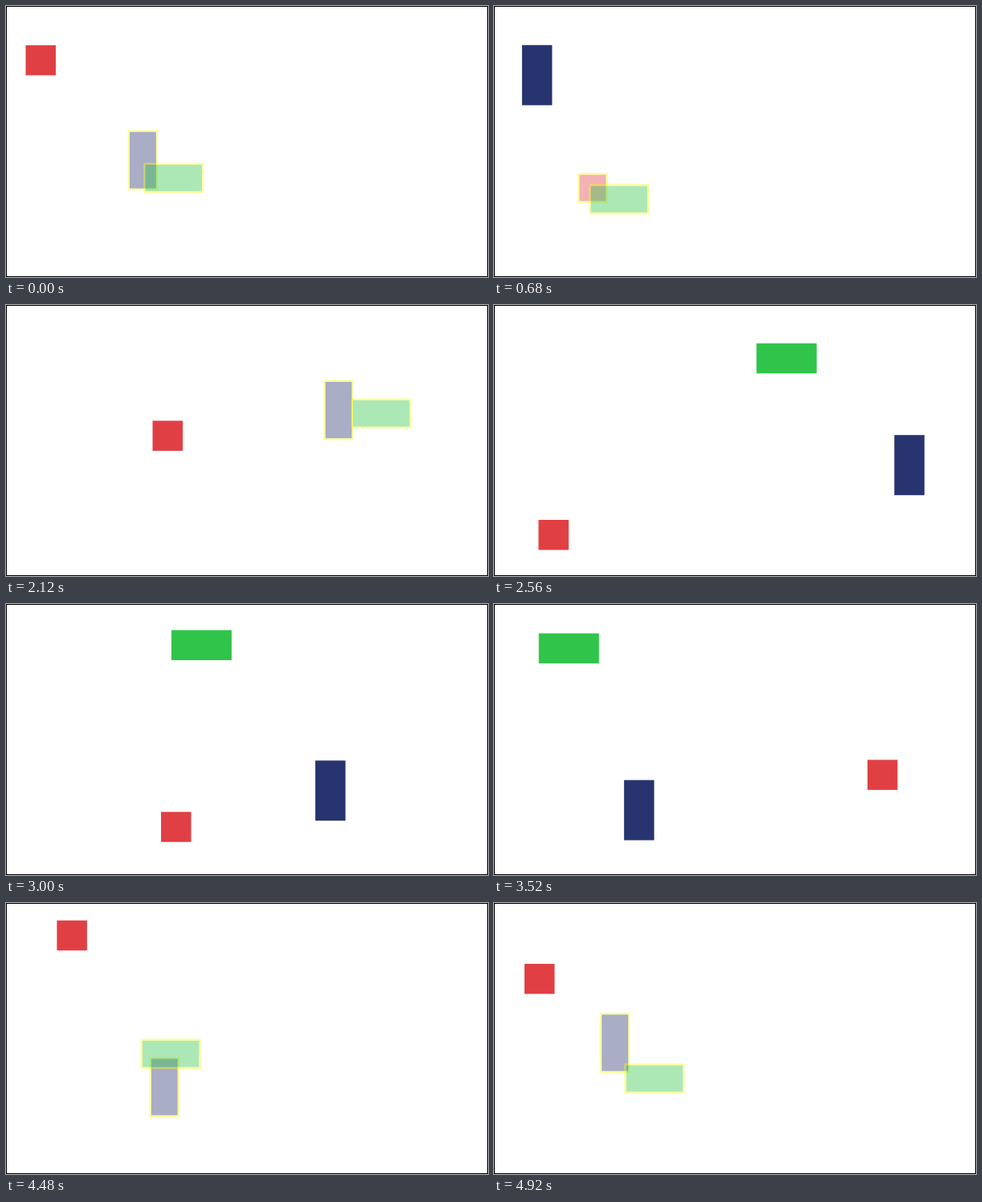
Animation, 600 px wide and 338 px high, one loop 4960 ms. Source, as an HTML page with a canvas:

```html
<!DOCTYPE html>
<html lang="en">
<head>
<meta charset="utf-8">
<title>Overlap detection</title>
<style>
  html, body { margin: 0; height: 100%; overflow: hidden; background: #fff; }
  canvas { display: block; }
</style>
</head>
<body>
<canvas id="stage" width="600" height="338"></canvas>
<script>
const ctx = document.getElementById('stage').getContext('2d');

const LOOP = 4960, TICK = 40;     // playback length and frame step, ms
const LEG = 961, OFFSET = 209;    // time between waypoints, phase at start
const SCALE = 0.75, SIZE = 50, BORDER = 3;

const point = (x, y) => ({ x, y });
const corner = point(0, 0), center = point(250, 250), low = point(150, 300),
      right = point(700, 240), top_ = point(400, 40), left = point(30, 50),
      bottom = point(30, 400);

// The tall and the wide box run the same ring in opposite directions.
const ring = [left, top_, right, low, center];
const box = (color, w, h, path) => ({ color, w: w * SIZE, h: h * SIZE, path });
const boxes = [
  box('#e04044', 1, 1, [corner, low, top_, bottom, right]),
  box('#283470', 1, 2, [center, ...ring.slice(0, -1)]),
  box('#30c54a', 2, 1, [...ring].reverse())
];

function move(box, time) {
  const legs = time / LEG, i = Math.floor(legs), f = legs - i;
  const n = box.path.length;
  const from = box.path[i % n], to = box.path[(i + 1) % n];
  box.x = from.x + (to.x - from.x) * f;
  box.y = from.y + (to.y - from.y) * f;
}

const overlap = (a, b) =>
  a.x < b.x + b.w && b.x < a.x + a.w && a.y < b.y + b.h && b.y < a.y + a.h;

function drawBox(box) {
  const { x, y, w, h, color } = box;
  const hit = boxes.some(other => other !== box && overlap(box, other));
  const inset = hit ? BORDER : 0;
  ctx.globalAlpha = hit ? 0.4 : 1;
  ctx.fillStyle = color;
  ctx.fillRect(x + inset, y + inset, w - 2 * inset, h - 2 * inset);
  if (hit) {
    ctx.strokeStyle = '#ff0';
    ctx.lineWidth = BORDER;
    ctx.strokeRect(x + BORDER / 2, y + BORDER / 2, w - BORDER, h - BORDER);
  }
}

function draw() {
  const now = performance.now() % LOOP;
  const time = Math.floor(now / TICK) * TICK + OFFSET;
  boxes.forEach(box => move(box, time));

  ctx.clearRect(0, 0, 600, 338);
  ctx.save();
  ctx.scale(SCALE, SCALE);
  boxes.forEach(drawBox);
  ctx.restore();

  ctx.strokeRect(0.5, 0.5, 599, 337);
  requestAnimationFrame(draw);
}
draw();
</script>
</body>
</html>
```
